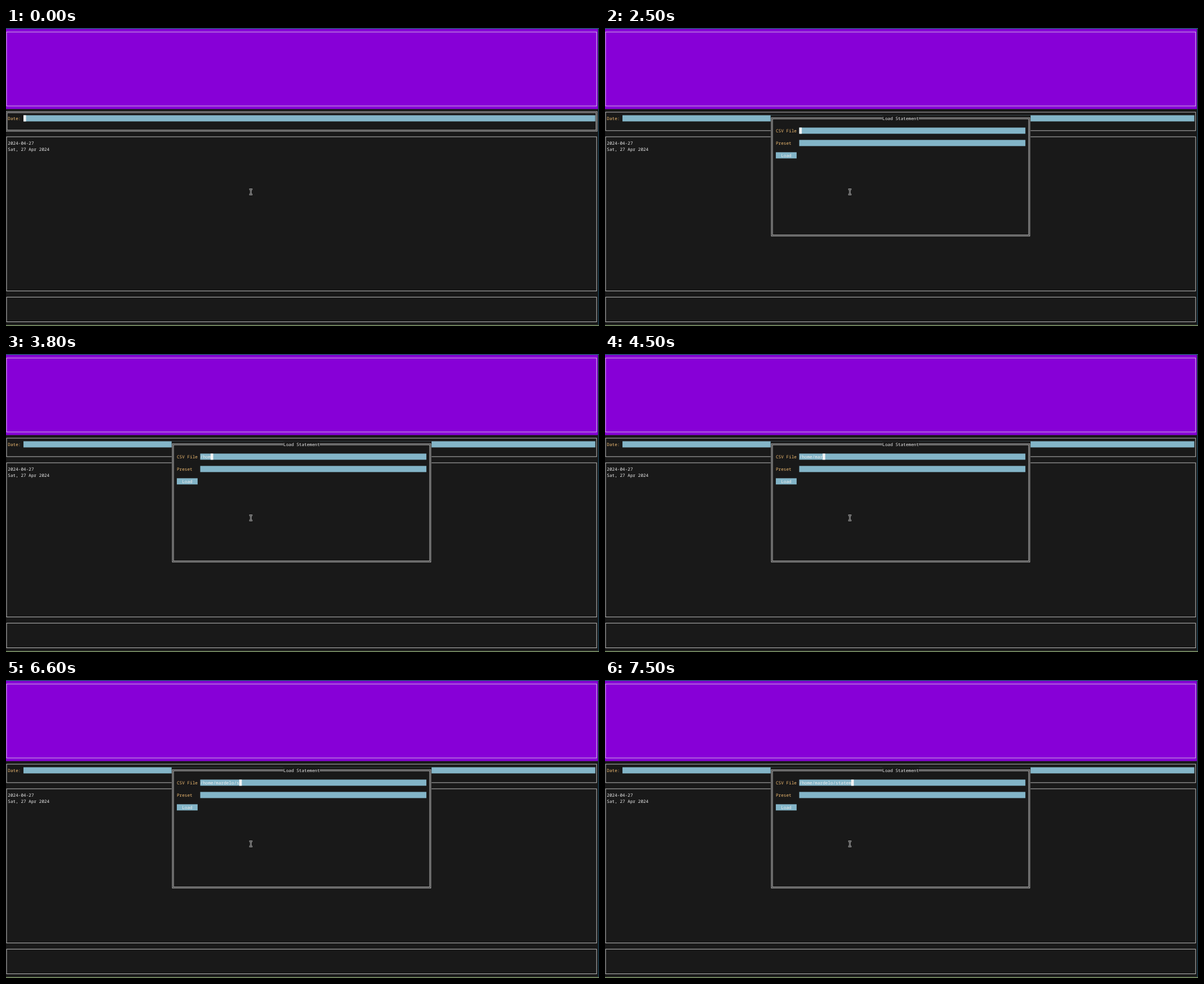
These frames come from a looping animation (1055x531 px, 8000 ms). An HTML page with a canvas:

```html
<!DOCTYPE html>
<html lang="en">
<head>
<meta charset="utf-8">
<title>Load statement</title>
<style>
  html, body { margin: 0; width: 100%; height: 100%; overflow: hidden; background: #191919; }
  canvas { display: block; }
</style>
</head>
<body>
<canvas id="screen" width="1055" height="531"></canvas>
<script>
const ctx = document.getElementById('screen').getContext('2d');

const LOOP = 8000;
const SHORTCUTS_AT = 1100;
const DIALOG_AT = 2500;
const PATH = '/home/mardelo/statem';
const KEY_TIMES = [
  3300, 3600, 3700, 3800, 4000, 4100,
  4300, 4400, 4500, 4600, 4700, 4800, 4900, 5100,
  6600, 6800, 7000, 7200, 7400, 7500
];

const CELL_W = 4.6245, CELL_H = 10.99;
const COLORS = {
  back: '#191919', line: '#e4e4e4', text: '#eeeeee',
  label: '#f0bc72', field: '#83b5c8', banner: '#8700d7'
};

// Terminal grid to pixels
const colX = col => -1.3 + col * CELL_W;
const rowY = row => 1.6 + row * CELL_H;

function rect(x, y, w, h, color) {
  ctx.fillStyle = color;
  ctx.fillRect(x, y, w, h);
}

function cells(col, row, cols, rows, color) {
  rect(colX(col), rowY(row), cols * CELL_W, rows * CELL_H, color);
}

function text(col, row, string, color = COLORS.text) {
  ctx.fillStyle = color;
  [...string].forEach((char, i) => ctx.fillText(char, colX(col + i), rowY(row) + 8.6));
}

// Border through the centres of the outer cells
function border(left, top, right, bottom, double = false) {
  const x = colX(left + 0.5), y = rowY(top + 0.5);
  const w = (right - left) * CELL_W, h = (bottom - top) * CELL_H;
  ctx.strokeStyle = COLORS.line;
  ctx.lineWidth = 0.8;
  for (const grow of double ? [-1, 1] : [0]) {
    ctx.strokeRect(x - grow, y - grow, w + 2 * grow, h + 2 * grow);
  }
}

function popup(left, top, right, bottom, titleCol, title) {
  cells(left, top, right - left + 1, bottom - top + 1, COLORS.back);
  border(left, top, right, bottom, true);
  cells(titleCol, top, title.length, 1, COLORS.back);
  text(titleCol, top, title);
}

const cursor = (col, row) => cells(col, row, 1, 1, '#f4f4f4');

function drawBase(dateFocused) {
  rect(0, 0, 1055, 531, COLORS.back);
  rect(0, 0, 1055, 1.6, '#1d6078');
  rect(1053.5, 1.6, 1.5, 527.5, '#1c3f50');
  rect(0, 529.3, 1055, 1.7, '#7d9468');

  cells(0, 0, 228, 13, COLORS.banner);
  border(0, 0, 227, 12);

  border(0, 13, 227, 16, dateFocused);
  text(1, 14, 'Date:', COLORS.label);
  cells(7, 14, 220, 1, COLORS.field);
  if (dateFocused) cursor(7, 14);

  border(0, 17, 227, 42);
  text(1, 18, '2024-04-27');
  text(1, 19, 'Sat, 27 Apr 2024');
  border(0, 43, 227, 47);
}

function drawShortcuts() {
  popup(89, 19, 138, 28, 110, 'Shortcuts');
  text(90, 20, 'd - Discard statement');
  text(90, 21, 'l - Load statement');
  text(90, 22, 'q - Quit');
}

function drawDialog(time) {
  const typed = KEY_TIMES.filter(key => key <= time).length;
  popup(64, 14, 163, 33, 107, 'Load Statement');
  text(66, 16, 'CSV File', COLORS.label);
  cells(75, 16, 87, 1, COLORS.field);
  text(75, 16, PATH.slice(0, typed));
  cursor(75 + typed, 16);
  text(66, 18, 'Preset', COLORS.label);
  cells(75, 18, 87, 1, COLORS.field);
  cells(66, 20, 8, 1, COLORS.field);
  text(68, 20, 'Load');
}

function drawPointer() {
  const beam = new Path2D('M432.8 287.4h5.6M435.6 287.4v9.2M432.8 296.6h5.6');
  ctx.lineWidth = 2.2;
  ctx.strokeStyle = '#dddddd';
  ctx.stroke(beam);
  ctx.lineWidth = 0.8;
  ctx.strokeStyle = '#111111';
  ctx.stroke(beam);
}

function draw(time) {
  ctx.font = '7.7px "Noto Sans Mono", monospace';
  ctx.textRendering = 'geometricPrecision';
  drawBase(time < SHORTCUTS_AT);
  if (time >= DIALOG_AT) drawDialog(time);
  else if (time >= SHORTCUTS_AT) drawShortcuts();
  drawPointer();
}

const start = performance.now();
function frame() {
  draw((performance.now() - start) % LOOP);
  requestAnimationFrame(frame);
}
frame();
</script>
</body>
</html>
```
